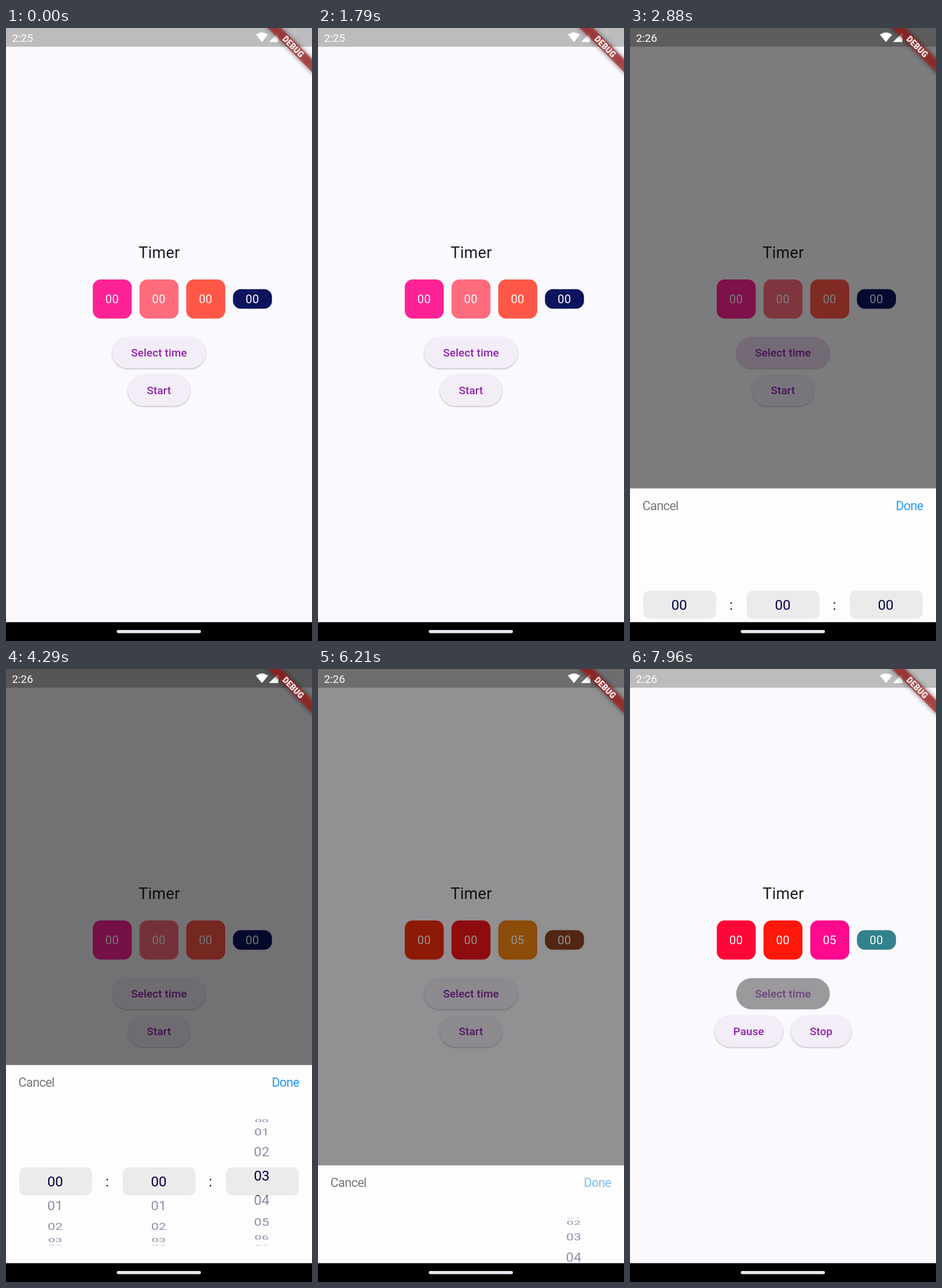
An HTML page that plays this animation: 529x1058 px, repeating every 8 s.

```html
<!DOCTYPE html>
<html lang="en">
<head>
<meta charset="utf-8">
<title>Timer</title>
<style>
html, body { margin: 0; width: 100%; height: 100%; overflow: hidden; background: #faf9fd; }
svg { display: block; width: 100%; height: 100%; font-family: Roboto, sans-serif; }
.mid { text-anchor: middle; }
.title { font-size: 26.94px; letter-spacing: .34px; fill: #1c1b1f; }
.num { font-size: 20.2px; letter-spacing: .34px; fill: #fff; }
.btn rect { fill: #f3edf7; filter: drop-shadow(0 1.4px 1.2px rgba(0, 0, 0, .3)); }
.btn text { font-size: 18.86px; font-weight: 500; letter-spacing: .135px; fill: #8e24aa; }
.btn .ink { fill: #9c27b0; filter: none; opacity: 0; }
.action { font-size: 21.55px; letter-spacing: -.55px; }
.wheel text, .colon { font-size: 24.25px; fill: #000046; text-anchor: middle; }

.tile, .early, .late, .five, .zero, .idle, .run, .off, .off + text, .sheet, .barrier, .done, .ink {
  animation: 8s step-end infinite;
}
.tile { animation-name: tint; }
.early { animation-name: early; }
.late { animation-name: late; }
.zero { animation-name: zero; }
.five { animation-name: five; }
.idle { animation-name: idle; }
.run { animation-name: run; }
.btn .off { animation-name: off; }
.btn .off + text { animation-name: offText; }
.sheet { animation-name: sheet; animation-timing-function: linear; }
.barrier { animation-name: barrier; animation-timing-function: linear; }
.done { animation-name: done; animation-timing-function: linear; }
.ink.pick { animation-name: pick; animation-timing-function: linear; }
.ink.go { animation-name: go; animation-timing-function: linear; }

@keyframes tint {
  0% { fill: var(--a); }
  76.375% { fill: var(--b); }
  98.4%, 100% { fill: var(--c); }
}
@keyframes early { 0% { opacity: 1; } 31.25%, 100% { opacity: 0; } }
@keyframes late { 0% { opacity: 0; } 31.25%, 100% { opacity: 1; } }
@keyframes zero { 0% { opacity: 1; } 76.375%, 100% { opacity: 0; } }
@keyframes five { 0% { opacity: 0; } 76.375%, 100% { opacity: 1; } }
@keyframes idle { 0% { opacity: 1; } 98.4%, 100% { opacity: 0; } }
@keyframes run { 0% { opacity: 0; } 98.4%, 100% { opacity: 1; } }
@keyframes off {
  0% { fill: #f3edf7; filter: drop-shadow(0 1.4px 1.2px rgba(0, 0, 0, .3)); }
  98.4% { fill: #c6c3c8; filter: none; }
  99%, 100% { fill: #9b999c; filter: none; }
}
@keyframes offText { 0% { fill: #8e24aa; } 98.4%, 100% { fill: #70427f; } }
@keyframes sheet {
  0%, 34.325% { transform: translateY(342px); }
  36.825%, 76.375% { transform: translateY(0); }
  78.66%, 96.86% { transform: translateY(313.5px); }
  96.87%, 100% { transform: translateY(342px); }
}
@keyframes barrier {
  0% { opacity: 0; }
  34.325% { opacity: 0; animation-timing-function: ease; }
  36.825% { opacity: .54; }
  76.375% { opacity: .54; animation-timing-function: ease-in; }
  77.625% { opacity: .43; }
  78.66%, 96.86% { opacity: .038; }
  96.87%, 100% { opacity: 0; }
}
@keyframes done {
  0%, 75.25% { opacity: 1; }
  75.75%, 76.375% { opacity: .4; }
  77.625% { opacity: .6; }
  78.75%, 100% { opacity: 1; }
}
@keyframes pick { 0%, 33% { opacity: 0; } 34.3%, 36.2% { opacity: .12; } 38.5%, 100% { opacity: 0; } }
@keyframes go { 0%, 97.2% { opacity: 0; } 98.3% { opacity: .12; } 98.4%, 100% { opacity: 0; } }
</style>
</head>
<body>
<svg viewBox="0 0 529 1058" preserveAspectRatio="none">
  <defs>
    <clipPath id="band"><rect y="860" width="529" height="48.5"/></clipPath>
    <clipPath id="around"><path d="M0 727H529V860H0ZM0 908.5H529V1026H0Z"/></clipPath>
    <filter id="blur" x="-20%" y="-100%" width="140%" height="300%"><feGaussianBlur stdDeviation="4.5"/></filter>
  </defs>

  <rect width="529" height="1058" fill="#faf9fd"/>
  <rect width="529" height="32.3" fill="#000" opacity=".25"/>
  <text class="title mid" x="265" y="396.5">Timer</text>

  <g class="mid">
    <rect class="tile" style="--a:#fd2396;--b:#f42d0a;--c:#ff0638" x="150" y="434" width="67.4" height="67.4" rx="13.5"/>
    <rect class="tile" style="--a:#fe6b7d;--b:#f81518;--c:#ff180c" x="230.8" y="434" width="67.4" height="67.4" rx="13.5"/>
    <rect class="tile" style="--a:#ff5747;--b:#f28411;--c:#ff0a8e" x="311.6" y="434" width="67.4" height="67.4" rx="13.5"/>
    <rect class="tile" style="--a:#0c145e;--b:#8c4323;--c:#31828c" x="392.4" y="450.8" width="67.4" height="33.7" rx="13.5"/>
    <g class="num">
      <text x="183.5" y="475">00</text>
      <text x="264.3" y="475">00</text>
      <text class="zero" x="345.1" y="475">00</text>
      <text class="five" x="345.1" y="475">05</text>
      <text x="425.9" y="475">00</text>
    </g>
  </g>

  <g class="btn mid">
    <rect class="off" x="183.5" y="533.5" width="162" height="54" rx="27"/>
    <text x="264.5" y="567.2">Select time</text>
    <rect class="ink pick" x="183.5" y="533.5" width="162" height="54" rx="27"/>
  </g>
  <g class="btn mid idle">
    <rect x="210.5" y="598.5" width="108" height="54" rx="27"/>
    <text x="264.5" y="632">Start</text>
    <rect class="ink go" x="210.5" y="598.5" width="108" height="54" rx="27"/>
  </g>
  <g class="btn mid run">
    <rect x="146" y="598.5" width="118.5" height="54" rx="27"/>
    <text x="205.2" y="632">Pause</text>
    <rect x="278" y="598.5" width="105" height="54" rx="27"/>
    <text x="330.4" y="632">Stop</text>
  </g>

  <rect class="barrier" width="529" height="1026"/>

  <g class="sheet">
    <rect y="683.5" width="529" height="343" fill="#fdfdfd"/>
    <text class="action" x="21.5" y="721" fill="#757575">Cancel</text>
    <text class="action done" x="507" y="721" text-anchor="end" fill="#2196f3">Done</text>
    <g fill="#ebebec">
      <rect x="23" y="860" width="126" height="48.5" rx="10.8"/>
      <rect x="201.7" y="860" width="126" height="48.5" rx="10.8"/>
      <rect x="380" y="860" width="126" height="48.5" rx="10.8"/>
    </g>
    <text class="colon" x="175" y="893">:</text>
    <text class="colon" x="353.5" y="893">:</text>
    <g class="wheel" clip-path="url(#around)" opacity=".447"></g>
    <g class="wheel" clip-path="url(#band)"></g>
  </g>

  <rect y="1025.5" width="529" height="33"/>
  <rect x="191.5" y="1039" width="145.5" height="5.4" rx="2.7" fill="#ece4ee"/>

  <g fill="#fff">
    <g font-size="18.8">
      <text class="early" x="10.5" y="23.5">2:25</text>
      <text class="late" x="10.5" y="23.5">2:26</text>
    </g>
    <path d="M442.5 24.3 432 11.6Q442.5 4 453 11.6Z"/>
    <path d="M454.5 24.3H471V8Z"/>
  </g>

  <g transform="translate(529 0) rotate(45)">
    <rect x="-60" y="37.7" width="120" height="16.2" opacity=".5" filter="url(#blur)"/>
    <rect x="-60" y="37.7" width="120" height="16.2" fill="#b71c1c" opacity=".627"/>
    <text class="mid" y="50.7" font-size="13.74" font-weight="900" letter-spacing=".3" fill="#fff">DEBUG</text>
  </g>
</svg>
<script>
const LOOP = 8000, CENTER = 884.3, RADIUS = 110, STEP = 0.39;
const columns = [85, 264, 442];
const items = [];

for (const layer of document.querySelectorAll('.wheel')) {
  columns.forEach((x, col) => {
    for (let n = 0; n < 10; n++) {
      const el = document.createElementNS('http://www.w3.org/2000/svg', 'text');
      el.textContent = String(n).padStart(2, '0');
      el.setAttribute('y', 8.6);
      layer.append(el);
      items.push({ el, x, col, n });
    }
  });
}

// Seconds wheel: a drag that speeds up, then a fling that settles on 5
function seconds(t) {
  if (t < 3700) return 0;
  if (t < 4290) return 3.235 * ((t - 3700) / 590) ** 1.3;
  const s = Math.min(1, (t - 4290) / 810);
  return 3.235 + 1.765 * (1 - (1 - s) ** 3);
}

// Each number sits on the front of a cylinder
function place({ el, x, col, n }, pos) {
  const u = n - (col === 2 ? pos : 0);
  const visible = Math.abs(u) < 4.1;
  el.style.display = visible ? '' : 'none';
  if (!visible) return;
  const y = CENTER + RADIUS * Math.sin(u * STEP);
  const cos = Math.max(0.1, Math.cos(u * STEP));
  const sx = 1 - 0.16 * (1 - cos);
  el.setAttribute('transform', `translate(${x} ${y.toFixed(2)}) scale(${sx.toFixed(3)} ${cos.toFixed(3)})`);
}

function draw() {
  const pos = seconds(performance.now() % LOOP);
  for (const item of items) place(item, pos);
  requestAnimationFrame(draw);
}
draw();
</script>
</body>
</html>
```
